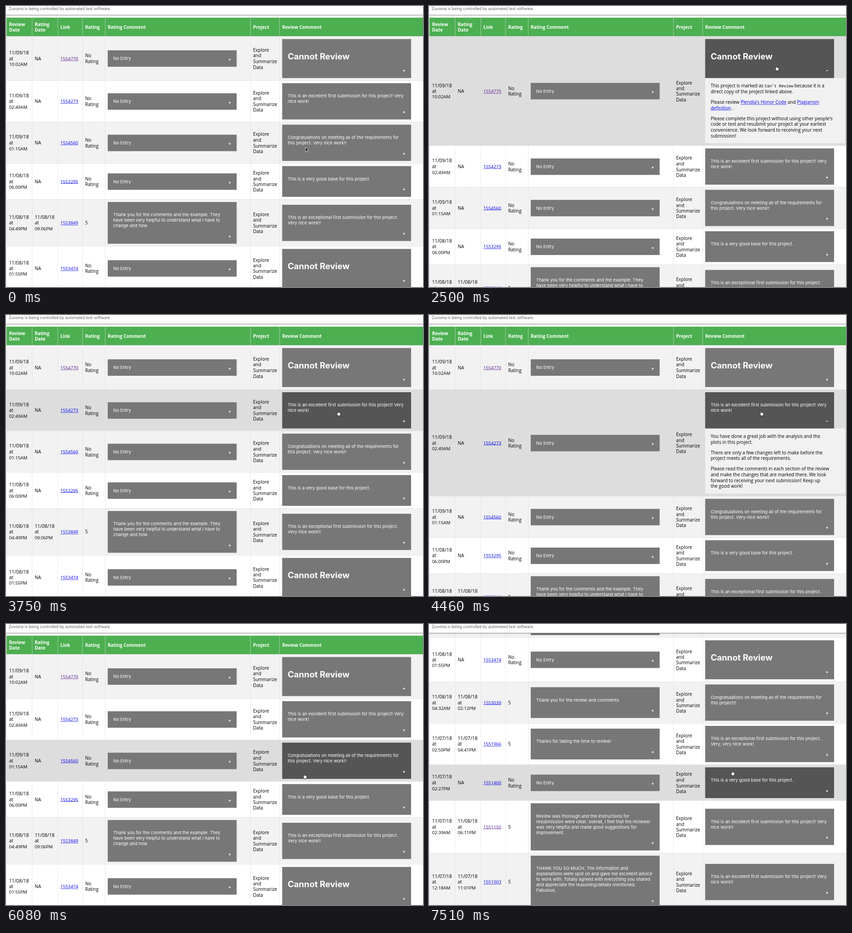
These frames come from a looping animation (910x615 px, 8 s). An HTML page:

```html
<!DOCTYPE html>
<html lang="en">
<head>
<meta charset="utf-8">
<title>Review table</title>
<style>
html, body { margin: 0; width: 100%; height: 100%; overflow: hidden; background: #fff; }
body { position: relative; color: #000; }
#bar { position: absolute; z-index: 2; left: 0; top: 0; width: 100%; height: 20px; box-sizing: border-box;
  background: #fff; border-bottom: 1px solid #b4b4b4; box-shadow: 0 1px 2px rgba(0,0,0,.28);
  font: 8.5px/12px Inter, Roboto, sans-serif; color: #606060; padding-left: 6px; white-space: nowrap; }
/* The table is laid out at full size and shown at two thirds. */
#page { position: absolute; left: 0; top: 0; width: 1370px; transform-origin: 0 0;
  font: 500 14.9px/18.75px "Open Sans", "Noto Sans", sans-serif; }
.row { display: grid; grid-template-columns: 84px 84px 81px 74px 476px 95px 476px;
  border-top: 1px solid #ddd; background: #fff; }
.row:nth-child(even) { background: #f2f2f2; }
.row.hot { background: #ddd; }
.head { height: 61px; background: #4caf50 !important; color: #fff; font-weight: 700; font-size: 14.85px; }
.cell { display: flex; flex-direction: column; justify-content: center; align-items: flex-start;
  box-sizing: border-box; padding: 8px 0 8px 8px; border-left: 1px solid #ddd; white-space: pre; }
.day { font-size: 15.6px; }
.hour, .id { font-size: 14.6px; }
a { color: #00e; text-decoration: underline; }
a.seen { color: #551a8b; }
.btn { position: relative; box-sizing: border-box; flex: none; width: 422px; padding: 18px; background: #777;
  color: #fff; font: 14.25px/18px Inter, Roboto, sans-serif; }
.btn p { margin: 15px 0 32px; }
.btn h1 { margin: 22px 0 35px; font-size: 27.75px; line-height: 35px; font-weight: 700; }
.btn::after { content: "+"; position: absolute; right: 18px; bottom: 16px; font-weight: 700; }
.btn.open::after { content: "\2212"; }
.hot .review .btn { background: #555; }
.panel { box-sizing: border-box; flex: none; width: 458px; height: 0; padding: 0 18px; overflow: hidden;
  background: #f1f1f1; font-size: 15px; }
.panel p { margin: 16px 0; }
code { font: 13px/15px "Liberation Mono", monospace; }
svg { position: absolute; z-index: 3; left: 0; top: 0; overflow: visible; }
</style>
</head>
<body>
<div id="bar">Zuvoma is being controlled by automated test software.</div>
<div id="page"></div>
<svg id="arrow" width="8" height="12"><path d="M0 0V9.2L2.1 7.2 3.6 10.6 5.2 9.9 3.7 6.6H6.7Z" fill="#000" stroke="#fff" stroke-width=".8"/></svg>
<svg id="hand" width="10" height="12"><path d="M2.9 1.4C2.9.3 4.6.3 4.6 1.4V4.6C5 4 6.2 4.1 6.3 4.9 6.8 4.4 7.8 4.6 7.9 5.3 8.5 5 9.4 5.3 9.4 6.2V8.3C9.4 10 8.4 10.4 8.4 11.7H3.9C3.7 10.3 2.2 9.4 1 7.6.3 6.5 1.4 5.9 2.1 6.6L2.9 7.4Z" fill="#fff" stroke="#000" stroke-width=".8"/></svg>
<script>
const $ = id => document.getElementById(id);
const LOOP = 8000, SCALE = 2 / 3, PANEL = 214;

const CANNOT = '# Cannot Review';
const BASE = 'This is a very good base for this project.';
const FIRST = 'This is an excellent first submission for this project! Very\nnice work!';
const MET = 'Congratulations on meeting all of the requirements for\nthis project';

// review date, rating date, link, rating, rating comment, review comment
const rows = [
  ['11/09/18 10:02AM', 'NA', '1554770', '', '', CANNOT],
  ['11/09/18 02:49AM', 'NA', '1554273', '', '', FIRST],
  ['11/09/18 01:15AM', 'NA', '1554560', '', '', MET + '. Very nice work!!'],
  ['11/08/18 06:00PM', 'NA', '1553295', '', '', BASE],
  ['11/08/18 04:49PM', '11/08/18 09:06PM', '1553849', '5',
    'Thank you for the comments and the example. They\nhave been very helpful to understand what I have to\nchange and how.',
    'This is an exceptional first submission for this project.\nVery nice work!!'],
  ['11/08/18 01:55PM', 'NA', '1553474', '', '', CANNOT],
  ['11/08/18 04:32AM', '11/08/18 02:12PM', '1553039', '5', 'Thank you for the review and comments.', MET + '!!'],
  ['11/07/18 02:50PM', '11/07/18 04:41PM', '1551966', '5', 'Thanks for taking the time to review!',
    'This is an exceptional first submission for this project.\nVery, very nice work!'],
  ['11/07/18 02:27PM', 'NA', '1551400', '', '', BASE],
  ['11/07/18 02:39AM', '11/08/18 06:11PM', '1551150', '5',
    'Review was thorough and the instructions for\nresubmission were clear. overall, I feel that the reviewer\nwas very helpful and made good suggestions for\nimprovement.',
    FIRST + '!'],
  ['11/07/18 12:18AM', '11/07/18 11:01PM', '1551003', '5',
    'THANK YOU SO MUCH. The information and\nexplanations were spot on and gave me excellent advice\nto work with. Totally agreed with everything you shared\nand appreciate the reasoning/details mentioned.\nFabulous.',
    FIRST + '!']
];
const seen = ['1554770', '1551150'];

const panels = [
  ["This project is marked as <code>Can't Review</code> because it is a\ndirect copy of the project linked above.",
   "Please review <a>Plendia's Honor Code</a> and <a>Plagiarism\ndefinition</a> .",
   "Please complete this project without using other people's\ncode or text and resubmit your project at your earliest\nconvenience. We look forward to receiving your next\nsubmission!"],
  ['You have done a great job with the analysis and the\nplots in this project.',
   'There are only a few changes left to make before the\nproject meets all of the requirements.',
   'Please read the comments in each section of the review\nand make the changes that are marked there. We look\nforward to receiving your next submission! Keep up\nthe good work!']
];

const cell = (html, cls = '') => `<div class="cell ${cls}">${html}</div>`;
const stamp = s => {
  const [day, hour] = s.split(' ');
  return hour ? `<div class="day">${day}</div><div>at</div><div class="hour">${hour}</div>` : s;
};
const button = s => {
  const body = !s ? 'No Entry' : s[0] === '#' ? `<h1>${s.slice(2)}</h1>` : `<p>${s}</p>`;
  return `<div class="btn">${body}</div>`;
};
const panel = ps => ps ? `<div class="panel">${ps.map(p => `<p>${p}</p>`).join('')}</div>` : '';

const heads = ['Review\nDate', 'Rating\nDate', 'Link', 'Rating', 'Rating Comment', 'Project', 'Review Comment'];
$('page').innerHTML = `<div class="row head">${heads.map(h => cell(h)).join('')}</div>` +
  rows.map(([date, rated, id, rating, note, review], i) => '<div class="row">' +
    cell(stamp(date)) + cell(stamp(rated)) +
    cell(`<a class="id${seen.includes(id) ? ' seen' : ''}">${id}</a>`) +
    cell(rating || 'No\nRating') + cell(button(note)) +
    cell('Explore\nand\nSummarize\nData') +
    cell(button(review) + panel(panels[i]), 'review') + '</div>').join('');

const rowEls = [...document.querySelectorAll('.row:not(.head)')];
const panelEls = [...document.querySelectorAll('.panel')];

// Stepped tracks: [time, value...]
const ease = u => u * u * (3 - 2 * u);
const glide = [180, 360, 530, 710, 890, 1070].map((t, i) => {
  const u = ease((i + 1) / 6);
  return [t, 653.5 + 93 * u, 309.5 - 184 * u];
});
const cursor = [
  [0, 653.5, 309.5], ...glide, [1250, 746.5, 124.5],
  [1610, 751.5, 132], [1790, 753, 131], [2500, 754, 130],
  [3400, 750, 138], [3570, 734, 180], [3750, 720.5, 209],
  [5900, 684, 281], [6080, 647, 327], [7510, 657.5, 320]
];
const hover = [[0, -1], [1610, 0], [3750, 1], [5900, 2], [6800, 5], [7510, 8]];
const scroll = [[0, 0], [6440, 180], [6620, 427], [6800, 570], [6970, 660], [7150, 720], [7330, 744]];
const opening = [
  [[0, 0], [1970, .25], [2140, .85], [2320, 1], [3220, .4], [3400, 0]],
  [[0, 0], [4100, .3], [4280, .9], [4460, 1], [5180, .4], [5360, 0]]
];
const at = (track, t) => track.findLast(k => k[0] <= t);

function draw(t) {
  const [, x, y] = at(cursor, t);
  const hand = t >= 1610;
  for (const id of ['arrow', 'hand']) {
    $(id).style.transform = `translate(${x}px, ${y}px)`;
    $(id).style.display = (id === 'hand') === hand ? 'block' : 'none';
  }
  const hot = at(hover, t)[1];
  rowEls.forEach((r, i) => r.classList.toggle('hot', i === hot));
  $('page').style.transform = `scale(${SCALE}) translate(1px, ${37.5 - at(scroll, t)[1]}px)`;
  panelEls.forEach((p, i) => {
    const part = at(opening[i], t)[1];
    const closing = t >= opening[i][4][0];
    p.style.height = part * PANEL + 'px';
    p.previousElementSibling.classList.toggle('open', part > 0 && !closing);
  });
}

const start = performance.now();
function frame() {
  draw((performance.now() - start) % LOOP);
  requestAnimationFrame(frame);
}
frame();
</script>
</body>
</html>
```
